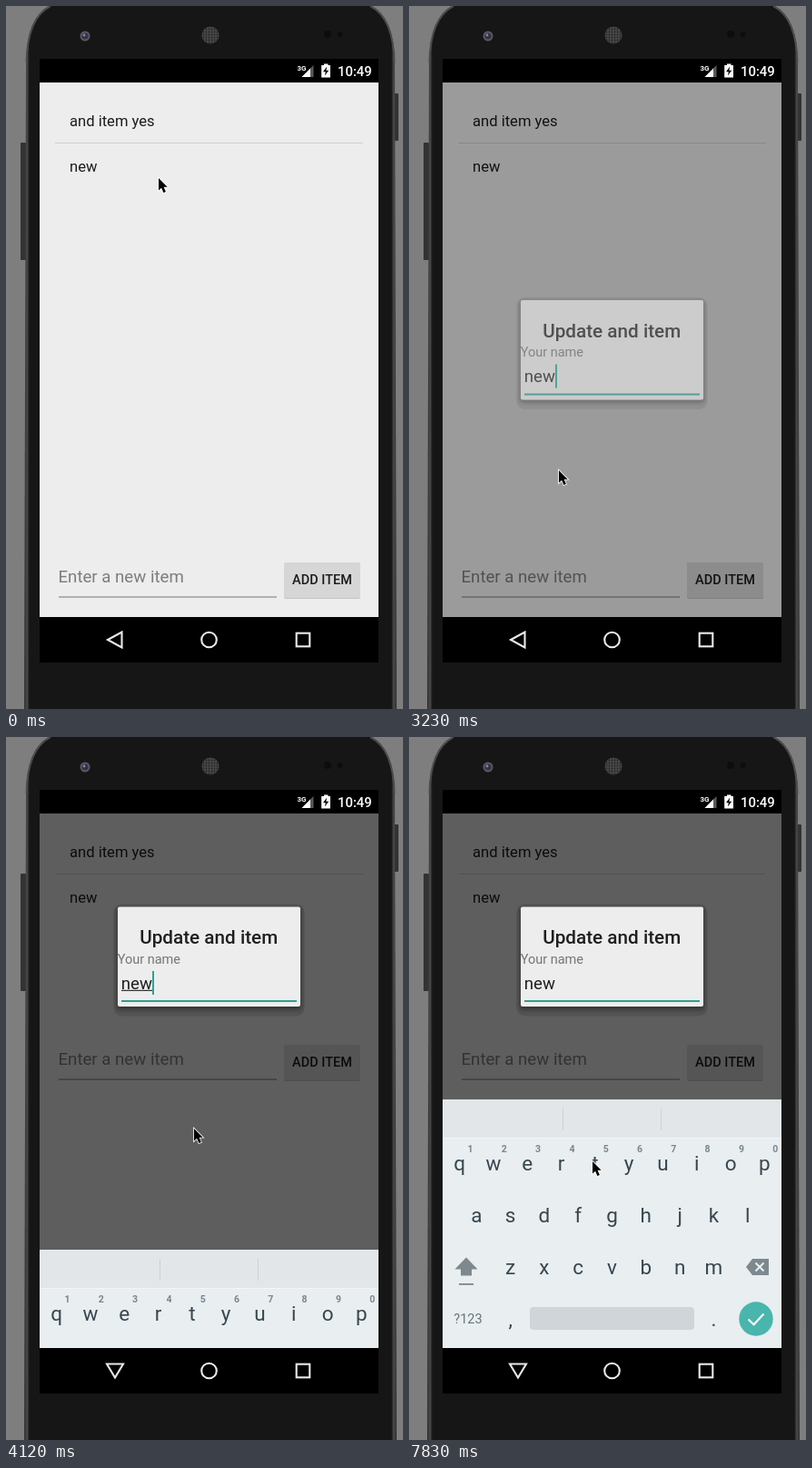
An HTML page for the animation above (8 s loop, 437 by 772 pixels).

```html
<!DOCTYPE html>
<html lang="en">
<head>
<meta charset="utf-8">
<title>Updating a list item</title>
<style>
  html, body { margin: 0; width: 100%; height: 100%; overflow: hidden; background: #7e7e7e; }
  svg { display: block; width: 437px; height: 772px; font-family: Roboto, sans-serif; }
  .mid { text-anchor: middle; }
  .medium { font-weight: 500; }
  .line { fill: none; stroke: #e9e9e9; stroke-width: 2.1; }
  .key { font-size: 22.5px; fill: #37474f; text-anchor: middle; }
  .hint { font-size: 10.5px; font-weight: 700; fill: #7b878c; text-anchor: middle; }
</style>
</head>
<body>
<svg viewBox="0 0 437 772">
  <defs>
    <linearGradient id="body" x1="20" x2="430" y1="0" y2="0" gradientUnits="userSpaceOnUse">
      <stop offset="0" stop-color="#303030"/>
      <stop offset=".008" stop-color="#4a4a4a"/>
      <stop offset=".014" stop-color="#161616"/>
      <stop offset=".986" stop-color="#161616"/>
      <stop offset=".992" stop-color="#4a4a4a"/>
      <stop offset="1" stop-color="#303030"/>
    </linearGradient>
    <pattern id="mesh" width="3" height="3" patternUnits="userSpaceOnUse">
      <rect width="3" height="3" fill="#484848"/>
      <circle cx="1.5" cy="1.5" r=".9" fill="#222"/>
    </pattern>
    <clipPath id="content"><rect x="37" y="84" width="373" height="587"/></clipPath>
    <clipPath id="row"><rect x="54" y="151" width="339" height="50"/></clipPath>
    <filter id="soft" x="-20%" y="-20%" width="140%" height="150%">
      <feGaussianBlur stdDeviation="2"/>
    </filter>
  </defs>

  <!-- phone -->
  <rect width="437" height="772" fill="#7e7e7e"/>
  <rect x="16" y="150" width="6" height="129" rx="1" fill="#333"/>
  <rect x="427" y="96" width="5" height="52" rx="1" fill="#333"/>
  <path d="M20 772L22 62Q23 12 48 0H402Q427 12 428 62L430 772Z" fill="url(#body)"/>
  <path d="M22.5 62Q23.5 13 49 0M427.500 62Q426.500 13 401 0" fill="none" stroke="#4c4c4c" stroke-width="2"/>
  <circle cx="87" cy="33" r="5.500" fill="#5b5b60"/>
  <circle cx="87" cy="33" r="3.600" fill="#33324a"/>
  <circle cx="86" cy="32" r="1.400" fill="#8785ad"/>
  <circle cx="225" cy="32" r="9.500" fill="url(#mesh)"/>
  <circle cx="354" cy="31" r="4" fill="#0d0d0d"/>
  <circle cx="367.500" cy="31" r="3" fill="#0d0d0d"/>
  <rect x="37" y="58" width="373" height="663"/>

  <!-- status bar -->
  <g fill="#fff">
    <text x="320.500" y="70.500" font-size="8" font-weight="700">3G</text>
    <path d="M338.500 65V78H325.500Z" fill="#5a5a5a"/>
    <path d="M335 68.500V78H325.500Z"/>
    <path d="M350 63.500h4.500v1.500h2.500v13.500h-9.800v-13.500h2.800Z"/>
    <path d="M353.200 66.500L349 72.300H351.800L350.900 76.500L355.200 70.700H352.400Z" fill="#000"/>
    <text x="365" y="77" font-size="14.900" class="medium">10:49</text>
  </g>

  <!-- app -->
  <g clip-path="url(#content)">
    <rect x="37" y="84" width="373" height="587" fill="#ededed"/>
    <rect x="54" y="150" width="339" height="1" fill="#cfcfcf"/>
    <g id="press" clip-path="url(#row)">
      <rect x="54" y="151" width="339" height="50" fill="#d5d5d5"/>
      <circle id="ripple" cy="176" fill="#c0c0c0"/>
    </g>
    <g font-size="16.580" fill="#1c1c1c">
      <text x="70" y="131.800">and item yes</text>
      <text x="70" y="182">new</text>
    </g>
    <g id="entry">
      <text x="57.500" y="632.700" font-size="18.650" fill="#7d7d7d">Enter a new item</text>
      <rect x="58" y="648.200" width="240" height="1.600" fill="#a2a2a2"/>
      <rect x="306" y="612" width="84" height="39" rx="2" fill="#c3c3c3"/>
      <rect x="306" y="611" width="84" height="39" rx="2" fill="#d6d6d6"/>
      <text x="348" y="635.400" font-size="14.500" class="mid medium" fill="#1c1c1c">ADD ITEM</text>
    </g>
    <rect id="dim" x="37" y="84" width="373" height="587"/>

    <g id="dialog">
      <rect x="118.500" y="320" width="210" height="123" rx="9" opacity=".12"/>
      <rect x="122" y="324" width="203" height="112" rx="3" opacity=".35" filter="url(#soft)"/>
      <rect x="123" y="323" width="201" height="109.500" rx="2" fill="#ededed"/>
      <text x="223.200" y="363.700" font-size="20.700" class="mid medium" fill="#1f1f1f">Update and item</text>
      <text x="122.700" y="385" font-size="14.500" fill="#757575">Your name</text>
      <text x="126.800" y="413.300" font-size="18.650" fill="#1f1f1f">new</text>
      <rect id="underline" x="127" y="414.300" width="34" height="1.200" fill="#333"/>
      <rect id="caret" x="161" y="393.500" width="2" height="26" fill="#26a69a"/>
      <rect x="127" y="425.500" width="193" height="2" fill="#319d93"/>
    </g>

    <g id="keyboard">
      <rect x="37" y="398" width="373" height="273" fill="#e9eef0"/>
      <rect x="37" y="398" width="373" height="42" fill="#e2e6e8"/>
      <rect x="37" y="440" width="373" height="1" fill="#f3f6f7"/>
      <path d="M169.500 408V432M277.500 408V432" stroke="#cbd1d4"/>
      <g id="words" font-size="18.650" class="mid" fill="#849095">
        <text x="121.500" y="427.600">news</text>
        <text x="223" y="427.600" font-weight="700" fill="#4b5a62">new</text>
        <text x="325" y="427.600">newly</text>
        <g fill="#4b5a62">
          <circle cx="217.500" cy="437" r="1.500"/><circle cx="223.200" cy="437" r="1.500"/><circle cx="229" cy="437" r="1.500"/>
        </g>
      </g>
      <g id="keys"></g>
      <g fill="#7d898e">
        <path d="M63 571.500L75.500 584.500H69V591.500H57V584.500H50.500Z"/>
        <rect x="55" y="600" width="16" height="1.800"/>
        <path d="M371 582L378 573H396V591H378Z"/>
      </g>
      <path d="M381.500 577.500l9 9m0-9l-9 9" stroke="#e9eef0" stroke-width="2"/>
      <text x="65" y="644" font-size="14.500" class="mid" fill="#66757c">?123</text>
      <rect x="133" y="626" width="181" height="25" rx="4" fill="#cfd5d8"/>
      <circle cx="382" cy="639" r="18.700" fill="#48b6ac"/>
      <path d="M373.500 639.500L379.500 645.200L390.500 633.500" fill="none" stroke="#fff" stroke-width="2.200"/>
    </g>
  </g>

  <!-- navigation bar -->
  <path id="back" class="line" d="M112 696L127.500 687.500V704.500Z"/>
  <path id="hide" class="line" d="M111 688.500H129L120 703.500Z"/>
  <circle class="line" cx="223.500" cy="696" r="8.300"/>
  <rect class="line" x="319.700" y="688.700" width="14.600" height="14.600"/>

  <path id="pointer" d="M0 0V13.600L3.100 10.700L5.400 16L7.900 15L5.600 9.800H9.700Z" stroke="#fff" stroke-width="1.600" paint-order="stroke"/>
</svg>

<script>
const LOOP = 8000;
const el = Object.fromEntries([...document.querySelectorAll('svg [id]')].map(n => [n.id, n]));

// Each step: start time, then the values held until the next step.
const pointer = [
  [0, 168, 189], [450, 160, 184], [600, 153, 179], [740, 152, 180], [1430, 154, 181], [2330, 119, 181],
  [2930, 140, 380], [3080, 159, 546], [3230, 165, 510], [3380, 167, 478], [3530, 180, 440],
  [3680, 192, 415], [3820, 202, 405], [3970, 205, 403], [4120, 207, 430], [4270, 211, 520],
  [4410, 214, 600], [4560, 217, 652], [4710, 217, 655], [4860, 217, 648], [5460, 216, 630],
  [5610, 205, 560], [5760, 185, 420], [5910, 166, 310], [6050, 159, 272], [6200, 158, 270],
  [7090, 160, 285], [7240, 172, 340], [7390, 185, 400], [7530, 195, 440], [7680, 200, 460], [7830, 202, 466]
];
const ripple = [[0, 0, 0], [2780, 130, 30], [2930, 157, 68], [3080, 183, 105]];
const dim = [[0, 0], [3230, .35], [3380, .6]];
const dialog = [[0, 0], [3230, .6], [3380, 1]];
const caret = [[0, 1], [4270, 0], [4710, 1], [5160, 0], [5610, 1], [6940, 0], [7390, 1], [7830, 0]];
const slide = [[0, 273], [4120, 165], [4270, 50], [4410, 0]];

const at = (steps, t) => steps.findLast(s => s[0] <= t).slice(1);
const show = (node, on) => node.setAttribute('visibility', on ? 'visible' : 'hidden');
const move = (node, x, y) => node.setAttribute('transform', `translate(${x} ${y})`);

function addText(cls, x, y, label) {
  const node = document.createElementNS(el.keys.namespaceURI, 'text');
  node.setAttribute('class', cls);
  node.setAttribute('x', x);
  node.setAttribute('y', y);
  node.textContent = label;
  el.keys.append(node);
}

const PITCH = 37.3;
[['qwertyuiop', 55.7, 476], ['asdfghjkl', 74.3, 532.7], ['zxcvbnm', 111.6, 589.7]].forEach(([row, x, y]) =>
  [...row].forEach((letter, i) => addText('key', x + i * PITCH, y, letter)));
[...'1234567890'].forEach((digit, i) => addText('hint', 67.5 + i * PITCH, 456, digit));
addText('key', 111.6, 646.5, ',');
addText('key', 335.4, 646.5, '.');

function draw(t) {
  move(el.pointer, ...at(pointer, t));

  const [cx, r] = at(ripple, t);
  el.ripple.setAttribute('cx', cx);
  el.ripple.setAttribute('r', r);
  show(el.press, t >= 2780 && t < 3230);

  const lifted = t >= 3970;
  move(el.entry, 0, lifted ? -273 : 0);
  move(el.dialog, 0, lifted ? -136.5 : 0);
  el.dim.setAttribute('opacity', at(dim, t)[0]);
  el.dialog.setAttribute('opacity', at(dialog, t)[0]);
  el.caret.setAttribute('opacity', at(caret, t)[0]);
  show(el.underline, lifted && t < 6200);

  move(el.keyboard, 0, at(slide, t)[0]);
  show(el.keyboard, t >= 4120);
  el.words.setAttribute('opacity', t >= 4560 && t < 6200 ? 1 : 0);
  show(el.back, t < 3820);
  show(el.hide, t >= 3820);
}

function frame() {
  draw(performance.now() % LOOP);
  requestAnimationFrame(frame);
}
frame();
</script>
</body>
</html>
```
